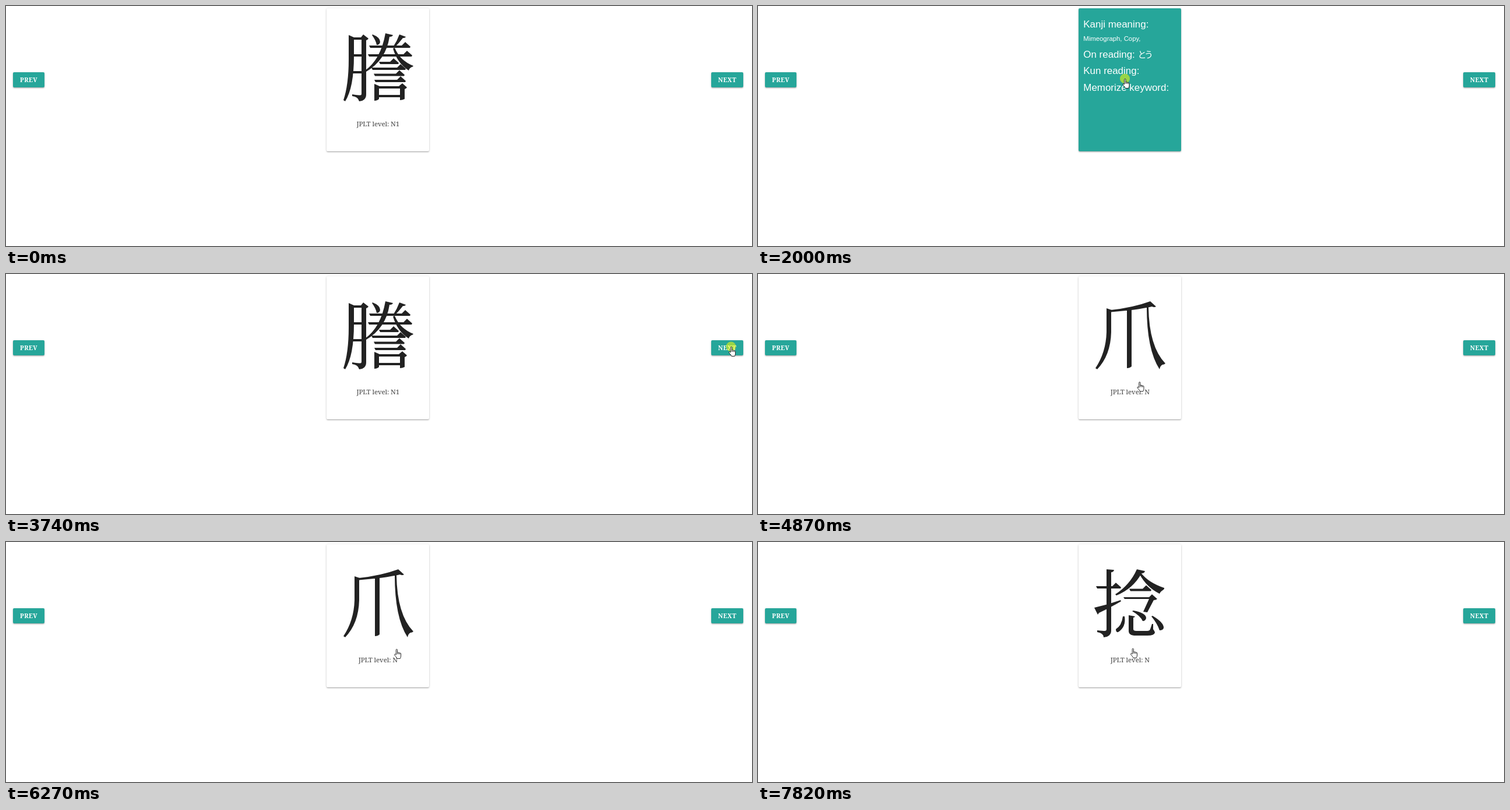
An HTML page for the animation above (8000 ms loop, 1280x413 px).

```html
<!DOCTYPE html>
<html lang="en">
<head>
<meta charset="utf-8">
<title>Kanji flash cards</title>
<style>
  html, body { margin: 0; width: 100%; height: 100%; overflow: hidden; background: #fff; }
  .box { position: absolute; border-radius: 2px; background: #26a69a;
    box-shadow: 0 1.4px 1.4px rgba(0,0,0,.14), 0 2px .7px -1.4px rgba(0,0,0,.12), 0 .7px 3.5px rgba(0,0,0,.2); }
  .button { top: 114px; height: 25.5px; font: bold 10.6px/26px "Noto Serif", serif;
    letter-spacing: .4px; color: #fff; text-align: center; }
  #card { left: 550px; top: 3.5px; width: 176px; height: 246.5px; }
  svg { position: absolute; left: 0; top: 0; }
  .kanji { fill: #222; }
  .level { font: 11.5px "Noto Serif", serif; letter-spacing: -.1px; fill: #444; text-anchor: middle; }
  .back { font: 16.95px "Liberation Sans", Arial, sans-serif; fill: #fff; }
  .small { font-size: 11.35px; }
  .kana { font: 15px "Noto Sans CJK JP", "Noto Sans CJK", sans-serif; font-feature-settings: "palt"; letter-spacing: -1.2px; }
  #cursor path { fill: #fff; stroke: #111; stroke-width: .9; stroke-linejoin: round; }
</style>
</head>
<body>
<div class="box button" style="left:12px;width:54px">PREV</div>
<div class="box button" style="left:1210px;width:55px">NEXT</div>
<div class="box" id="card"></div>
<svg width="1280" height="413" viewBox="0 0 1280 413">
  <g id="faces"></g>
  <circle id="click" r="8.5" fill="#ff0" fill-opacity=".53"/>
  <g id="cursor">
    <path id="hand" d="M-.8 10V1.6Q-.8.4.3.4T1.4 1.6V6Q2.6 5 3.5 6.4Q4.7 5.6 5.5 7Q6.9 6.4 7.5 8V12Q7.5 14 6.2 16.5H1Q0 14-3.4 10.6Q-3.9 9-2.5 8.8Q-1.6 9-.8 10ZM1.4 6v3M3.5 6.6v2.4M5.5 7.3v2"/>
    <path id="arrow" d="M0 0V12L2.8 9.4L4.7 13.7L6.6 12.9L4.7 8.7H8.6Z"/>
  </g>
</svg>
<script>
const $ = id => document.getElementById(id);

// Horizontal brush stroke with a triangular right end
const bar = (x1, x2, y) => `M${x1} ${y}H${x2 - 15}l6-6l9 8l-1 2H${x1 + 2}z`;
const glyph = (...strokes) => `<path class="kanji" d="${strokes.join('')}"/>`;
const level = text => `<text class="level" x="638.3" y="206.8">JPLT level: ${text}</text>`;
const line = (y, text, cls = '') => `<text class="back ${cls}" x="558.3" y="${y}">${text}</text>`;
const kana = (x, y, text) => `<text class="back kana" x="${x}" y="${y}">${text}</text>`;

const moon = 'M588 50L597 54V86Q597 140 582 164L579 162Q588 135 588 92Z' +
  'M595 54H609L613 49L622 56Q621 58 618 59V152Q618 163 606 164Q604 156 594 155V152Q604 153.5 608 153.5Q610 153.5 610 151V58H595Z' +
  'M595 83h16v4h-16zM595 112h16v4h-16z';
const crown = 'M629 49Q642 54 642 62Q641 67 636 67Q635 60 628 50Z' +
  'M651 47L664 50Q663 53 658 53Q652 93 618 113L616 111Q643 92 651 47Z' +
  'M675 49L686 53Q685 55 681 55Q674 64 668 70L665 69Q671 60 675 49Z' +
  'M667 72Q676 94 699 103Q698 105 696 105Q692 107 691 111Q671 98 664 73Z';
const mouth = 'M632 134L641 138H674L680 133L688 140Q687 142 684 143V160Q680 162 676 162V157H640V160Q637 163 632 163ZM640 142V153H676V142Z';

const claw = 'M598 59L607 62V65L606 66V100Q605 140 582 164L579 162Q597 135 598 100Z' +
  'M605 62Q643 58 673 47L683 56Q680 58 676 56Q650 62 605 65.5Z' +
  'M633 62H641V159Q638 162 633 162Z' +
  'M667 57H670Q671 125 699 154Q697 156 694 156Q690 158 689 164Q667 130 667 57Z';

const handRadical = 'M598 47L611 48Q610 52 606 52V152Q606 163 593 164Q593 157 582 155V152Q592 153 595 153Q598 153 598 150Z' +
  'M577 113Q600 108 622 100L623 102Q606 112 585 122L583 125Z';
const roof = 'M650 47L664 50Q663 54 658 54Q644 80 615 92L613 90Q638 74 650 47Z' +
  'M657 53Q670 70 697 79Q698 81 693 84Q690 86 689 89Q667 78 655 56Z' +
  'M627 95H671L676 90L685 98Q683 100 679 100L668 121L661 120L671 98H629Z';
const heart = 'M626 128L629 128Q632 146 618 155Q614 156 614 150Q624 144 626 128Z' +
  'M636 126L647 128Q646 130 644 130V150Q644 153 649 153H668Q672 153 673 150L676 141H678V150Q681 154 681 156Q680 161 668 161H648Q636 161 636 153Z' +
  'M644 118Q666 122 666 131Q665 136 660 136Q656 127 642 119Z' +
  'M677 127Q697 139 696 148Q695 152 689 152Q685 140 675 128Z';

const fronts = [
  glyph(moon, crown, bar(623, 694, 68), bar(621, 697, 83), bar(640, 674, 96),
    bar(627, 686, 106), bar(631, 684, 116.5), bar(632, 686, 127), mouth) + level('N1'),
  glyph(claw) + level('N'),
  glyph(handRadical, bar(580, 623, 76), bar(637, 675, 80.5), roof, heart) + level('N')
];
const backs = [
  line(37.3, 'Kanji meaning:') + line(60, 'Mimeograph, Copy,', 'small') +
    line(89, 'On reading:') + kana(652, 89, 'とう') +
    line(117.3, 'Kun reading:') + line(145.5, 'Memorize keyword:'),
  line(37.3, 'Kanji meaning: <tspan class="small">Claw,</tspan>') + line(60.8, 'Nail, Talon,', 'small') +
    line(89.8, 'On reading:') + kana(652, 89.8, 'そう') +
    line(118, 'Kun reading:') + kana(659, 118, 'つめ つ') + kana(558.5, 140, 'ま-') +
    line(168.8, 'Memorize keyword:') + line(191.3, 'Claw,', 'small')
];

// [start ms, html, is back]
const faces = [
  [0, fronts[0]], [980, backs[0], true], [2160, fronts[0]], [3800, fronts[1]],
  [4940, backs[1], true], [6120, fronts[1]], [7190, fronts[2]]
];
const clicks = [[910, 980], [2000, 2160], [3740, 3800], [4790, 4870], [5950, 6120], [7120, 7190]];

const easeOut = p => 1 - (1 - p) ** 1.5;
const smooth = p => p * p * (3 - 2 * p);
// [first step ms, last step ms, steps, x, y, easing]
const moves = [
  [130, 840, 10, 641, 158.5, easeOut],
  [1680, 1850, 3, 629.5, 125, smooth],
  [2540, 3330, 11, 1189, 153, smooth],
  [3430, 3660, 4, 1244, 125, easeOut],
  [3880, 4190, 5, 765, 142, smooth],
  [4260, 4560, 5, 654.5, 185.5, easeOut],
  [6200, 6900, 10, 1211, 135, smooth],
  [6970, 7040, 2, 1233, 127, easeOut],
  [7270, 7750, 7, 652, 181, smooth],
  [7820, 7820, 1, 643, 183, smooth]
];

function pointerAt(t) {
  let x = 1291, y = 441;
  for (const [start, end, steps, toX, toY, ease] of moves) {
    if (t < start) break;
    const gap = (end - start) / (steps - 1) || 1;
    const p = ease(Math.min(steps, Math.floor((t - start) / gap + 1e-6) + 1) / steps);
    x += (toX - x) * p;
    y += (toY - y) * p;
  }
  return [x, y];
}

let shown;
function draw() {
  const t = performance.now() % 8000;
  const face = faces.findLast(f => t >= f[0]);
  if (face !== shown) {
    shown = face;
    $('faces').innerHTML = face[1];
    $('card').style.background = face[2] ? '#26a69a' : '#fff';
  }
  const [x, y] = pointerAt(t);
  const place = `translate(${x} ${y})`;
  const overLink = x > 550 && x < 726 && y > 3 && y < 250 || x > 1210 && x < 1265 && y > 114 && y < 140;
  $('cursor').setAttribute('transform', place);
  $('click').setAttribute('transform', place);
  $('hand').style.display = overLink ? '' : 'none';
  $('arrow').style.display = overLink ? 'none' : '';
  $('click').style.display = clicks.some(([a, b]) => t >= a && t < b) ? '' : 'none';
  requestAnimationFrame(draw);
}
draw();
</script>
</body>
</html>
```
